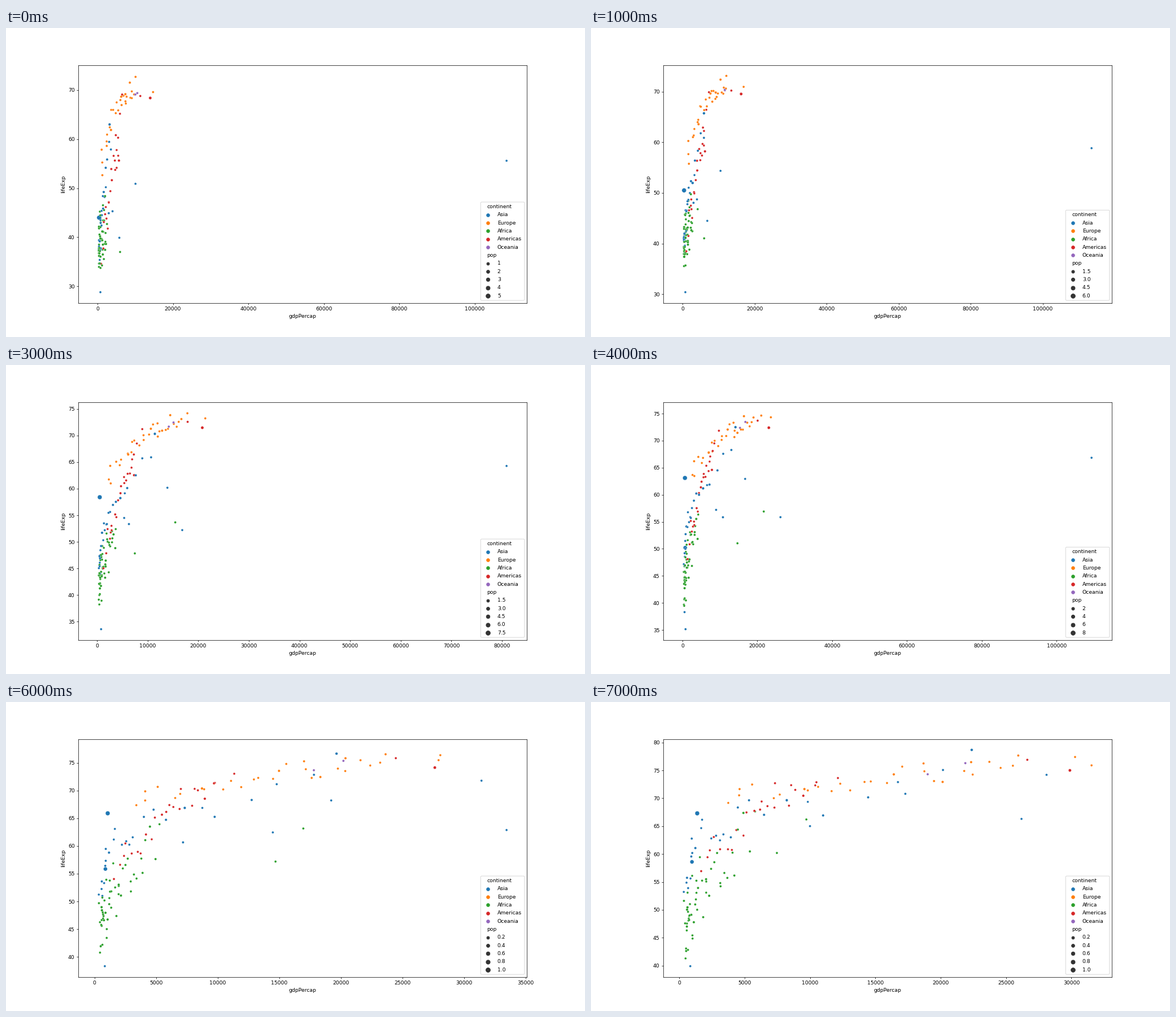
Animation, 1025 px wide and 547 px high, one loop 8 s. Source, as a matplotlib script:

```python
import numpy as np
import matplotlib.pyplot as plt
from matplotlib.animation import FuncAnimation
from matplotlib.patches import FancyBboxPatch

WIDTH, HEIGHT, DPI = 1025, 547, 66.667
YEARS = np.arange(1952, 1988, 5)
T = np.linspace(0, 1, len(YEARS))
COLORS = dict(Asia="#1f77b4", Europe="#ff7f0e", Africa="#2ca02c",
              Americas="#d62728", Oceania="#9467bd")

FLOOR = 28.8 + 11.1 * T             # lowest ordinary life expectancy
CEILING = 72.9 + 5.77 * T ** 1.7    # highest one
POP_MAX = 5.56 + 5.28 * T           # largest population, in 100 millions


def glide(start, end, ease=1.0):
    return start + (end - start) * T ** ease


def lifespan(start, end):
    return np.clip(glide(start, end, .9), FLOOR, CEILING)


def boom(base, rise, peak, width):
    """Income that swells around a peak year and falls back."""
    return base + rise * np.exp(-((YEARS - peak) / width) ** 2)


# Trends from poorest (u = 0) to richest (u = 1) country of a continent:
# gdp and life in the first year, then in the last
def asia(u):
    return (400 + 1300 * u + 1800 * u ** 5, 37 + 12 * u + 12 * u ** 5,
            400 + 4800 * u ** 1.4 + 15000 * u ** 5, 55 + 14 * u ** .7 + 6 * u ** 5)


def europe(u):
    gdp = 1200 + 8500 * u
    return (gdp, 70 - 10.4 * np.exp((2444 - gdp) / 2700) + u,
            4000 + 22500 * u, 70.3 + 6 * u)


def africa(u):
    return (380 + 1900 * u ** 1.8, 37.5 + 5 * u,
            450 + 900 * u + 4300 * u ** 4, 45 + 13 * u + 7 * u ** 6)


def americas(u):
    return (1400 + 4800 * u, 40 + 24 * u,
            1800 + 8500 * u + 1500 * u ** 8, 57 + 16 * u ** .6)


def oceania(u):
    return 10040 + 517 * u, 69.1 + .3 * u, 21889 - 2882 * u, 76.3 - 2 * u


# Trend, number of countries, spread around the trend
CLOUDS = {"Asia": (asia, 23, (150, 3, 300, 2)),
          "Europe": (europe, 28, (400, 1, 600, 1.2)),
          "Africa": (africa, 50, (110, 3.5, 110, 3.2)),
          "Americas": (americas, 23, (500, 3, 300, 2)),
          "Oceania": (oceania, 2, (0, 0, 0, 0))}


def build_points():
    rng = np.random.default_rng(7)
    points = []

    def add(continent, gdp, life, share=.02):
        track = np.column_stack([np.maximum(gdp, 350), life])
        points.append((track, COLORS[continent], share))

    for continent, (trend, count, spread) in CLOUDS.items():
        for u in np.linspace(0, 1, count):
            noise = np.clip(rng.normal(size=4), -1.8, 1.8)
            gdp0, life0, gdp1, life1 = np.array(trend(u)) + noise * spread
            add(continent, glide(gdp0, gdp1), lifespan(life0, life1),
                rng.exponential(.025))

    # Large or rich countries on steady paths
    add("Asia", glide(547, 977, 1.5), lifespan(37.4, 58.6), .7)
    add("Asia", glide(3217, 22376), lifespan(63, 78.7), .13)
    add("Americas", glide(13990, 29884), lifespan(68.4, 75), .25)
    add("Americas", glide(11367, 26627), lifespan(68.8, 76.9))
    add("Europe", glide(10095, 31541, 1.2), lifespan(72.7, 75.9))
    add("Europe", glide(14734, 30282), lifespan(69.6, 77.4))

    # Oil states
    kuwait = np.array([108.4, 113.5, 95.5, 80.9, 109.3, 59.3, 31.4, 28.1])
    add("Asia", 1000 * kuwait, lifespan(55.6, 74.2))
    add("Asia", boom(5500, 29000, 1979.5, 12.9), lifespan(39.9, 66.3))
    add("Asia", boom(9900, 9500, 1980, 14), lifespan(50.9, 70.8))
    add("Asia", boom(4000, 11000, 1980, 9), lifespan(45.3, 65))
    add("Asia", boom(3000, 9000, 1975, 8), lifespan(44.9, 63), .04)
    add("Africa", boom(2000, 21000, 1975, 12), lifespan(42.7, 66.2))
    add("Africa", boom(6000, 15700, 1977, 6.5), lifespan(37, 60.2))

    # Famine and war, and the country at the bottom
    add("Asia", glide(430, 1379, 2.5),
        np.interp(YEARS, [1952, 1957, 1962, 1967, 1972, 1987],
                  [44, 50.5, 44.5, 58.4, 63.1, 67.3]), 1)
    add("Asia", glide(400, 684),
        np.interp(YEARS, [1952, 1967, 1977, 1982, 1987],
                  [39.4, 45.4, 31.2, 51, 53.9]))
    add("Asia", glide(779, 852), FLOOR)

    rng.shuffle(points)
    tracks, colors, shares = zip(*points)
    return np.array(tracks), colors, np.array(shares)


def dot_area(share):
    return 18 + 54 * share


def padded(low, high):
    margin = .05 * (high - low)
    return low - margin, high + margin


def pop_ticks(largest):
    """Labels of the size legend and each one's share of the largest value."""
    if largest >= 10:
        largest /= 10
    step = next(s for s in (.2, 1, 1.5, 2) if largest / s < 5.6)
    digits = 0 if step == int(step) else 1
    return [(f"{v:.{digits}f}", v / largest) for v in np.arange(step, largest, step)]


def draw_legend(year):
    rows = [("continent", None, 0)]
    rows += [(name, color, 36) for name, color in COLORS.items()]
    rows += [("pop", None, 0)]
    rows += [(label, ".2", dot_area(share)) for label, share in pop_ticks(POP_MAX[year])]

    overlay.clear()
    overlay.set(xlim=(0, WIDTH), ylim=(HEIGHT, 0))
    overlay.axis("off")
    pitch, bottom = 14.32, 482.2
    first = 473.2 - pitch * (len(rows) - 1)
    top = first - 7.6
    overlay.add_patch(FancyBboxPatch(
        (840.3, top), 77.6, bottom - top, boxstyle="round,pad=0,rounding_size=1.85",
        facecolor="white", edgecolor=".8", alpha=.8, linewidth=1))
    for i, (label, color, area) in enumerate(rows):
        y = first + pitch * i
        if color:
            overlay.scatter(852.9, y + .7, s=area, color=color, linewidth=1)
        overlay.text(869.8 if color else 851.1, y + 3.3, label, fontsize=10)


def update(year):
    points = tracks[:, year]
    dots.set_offsets(points)
    ax.set_xlim(padded(350, points[:, 0].max()))
    ax.set_ylim(padded(points[:, 1].min(), CEILING[year]))
    draw_legend(year)
    return [dots]


plt.rcParams["font.family"] = "DejaVu Sans"
tracks, colors, shares = build_points()
fig = plt.figure(figsize=(15.375, 8.205), dpi=DPI)
ax = fig.add_subplot()
fig.subplots_adjust(right=.8997)
ax.set(xlabel="gdpPercap", ylabel="lifeExp")
dots = ax.scatter(*tracks[:, 0].T, s=dot_area(np.minimum(shares, 1)), c=colors,
                  edgecolor="white", linewidth=.34)
overlay = fig.add_axes([0, 0, 1, 1])

animation = FuncAnimation(fig, update, frames=len(YEARS), interval=1000, repeat=True)
plt.show()
```
